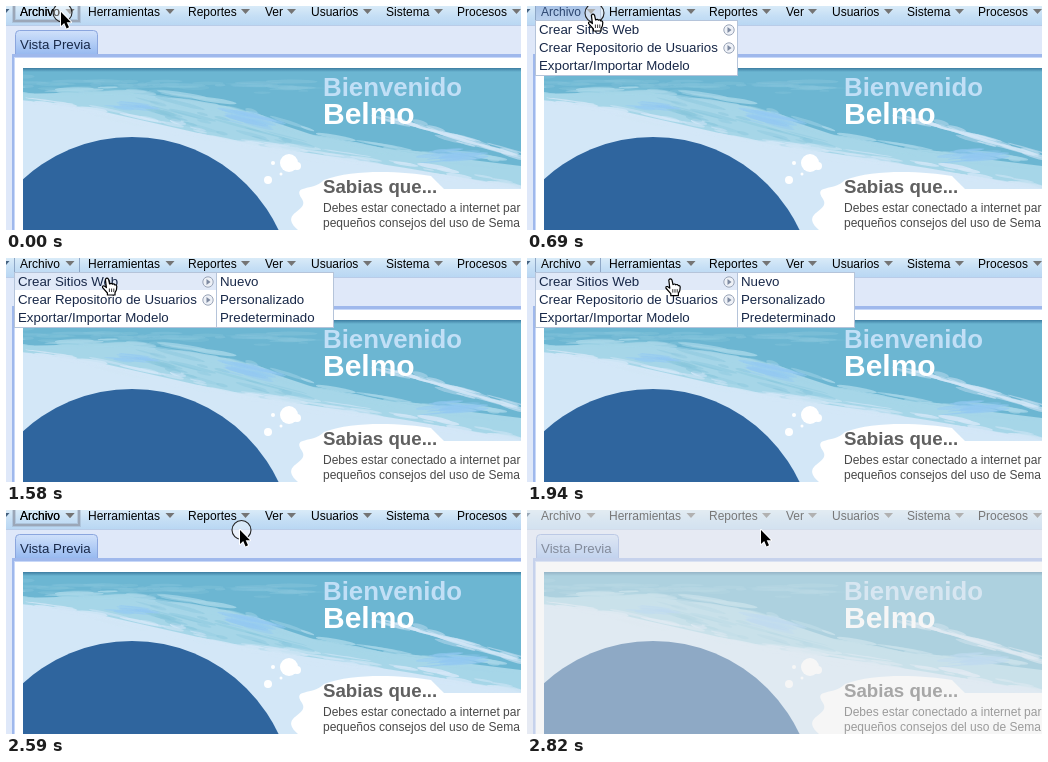
Animation of 515x224 px, one loop 2940 ms. Source, as an HTML page with a canvas:

```html
<!DOCTYPE html>
<html lang="es">
<head>
<meta charset="utf-8">
<title>Crear sitio</title>
<style>
html, body { margin: 0; width: 100%; height: 100%; overflow: hidden; background: #dfe8f9; }
canvas { display: block; width: 515px; height: 224px; }
</style>
</head>
<body>
<canvas id="stage" width="515" height="224"></canvas>
<script>
const W = 515, H = 224, LOOP = 2940;
const ctx = document.getElementById('stage').getContext('2d');
const FONT = '"Liberation Sans", Arial, sans-serif';
const BAR = [['Archivo', 14, 64], ['Herramientas', 82, 164], ['Reportes', 182, 239.5], ['Ver', 259, 285.5],
  ['Usuarios', 305, 361.5], ['Sistema', 380, 432.5], ['Procesos', 451, 510.5]];
const MENU = ['Crear Sitios Web', 'Crear Repositorio de Usuarios', 'Exportar/Importar Modelo'];
const SUBMENU = ['Nuevo', 'Personalizado', 'Predeterminado'];
const INK = '#182848', BORDER = '#8ba6de';

function text(c, str, x, y, size, color, weight = 'normal') {
  c.font = `${weight} ${size}px ${FONT}`;
  c.fillStyle = color;
  c.fillText(str, x, y);
}

function rect(c, x, y, w, h, color) {
  c.fillStyle = color;
  c.fillRect(x, y, w, h);
}

function frame(c, x, y, w, h, color) {
  c.strokeStyle = color;
  c.lineWidth = 1;
  c.strokeRect(x + .5, y + .5, w - 1, h - 1);
}

function disc(c, x, y, r, color) {
  c.fillStyle = color;
  c.beginPath();
  c.arc(x, y, r, 0, Math.PI * 2);
  c.fill();
}

function shade(c, y0, y1, ...colors) {
  const g = c.createLinearGradient(0, y0, 0, y1);
  colors.forEach((col, i) => g.addColorStop(i / (colors.length - 1), col));
  return g;
}

function triangle(c, x, y, color) {
  c.fillStyle = color;
  c.beginPath();
  c.moveTo(x - 4.5, y);
  c.lineTo(x + 4.5, y);
  c.lineTo(x, y + 5);
  c.fill();
}

let seed = 11;
const rnd = () => (seed = (seed * 16807) % 2147483647) / 2147483647;

// Dry-brush streaks scattered along a sloped band
function brush(c, n, x0, y0, x1, y1, spread, color, alpha) {
  c.fillStyle = color;
  for (let i = 0; i < n; i++) {
    const k = rnd(), x = x0 + (x1 - x0) * k;
    const y = y0 + (y1 - y0) * k + (rnd() + rnd() - 1) * spread;
    c.globalAlpha = alpha * (.5 + .5 * rnd());
    c.beginPath();
    c.ellipse(x, y, 5 + rnd() * 22, .6 + rnd() * 1.8, Math.atan2(y1 - y0, x1 - x0), 0, 7);
    c.fill();
  }
  c.globalAlpha = 1;
}

// Colour everything below a line of points and fray its edge
function wash(c, color, points) {
  c.beginPath();
  c.moveTo(0, H);
  points.forEach(([x, y]) => c.lineTo(x, y));
  c.lineTo(W, H);
  c.fillStyle = color;
  c.fill();
  points.slice(1).forEach(([x, y], i) => {
    const [px, py] = points[i];
    brush(c, Math.ceil((x - px) / 7), px, py, x, y, 8, color, .9);
  });
}

function paintBanner(c) {
  c.save();
  c.beginPath();
  c.rect(17, 62, W - 17, H - 62);
  c.clip();
  rect(c, 17, 62, W - 17, H - 62, '#6cb6d2');
  brush(c, 45, 17, 78, 300, 80, 8, '#85c4db', .6);
  wash(c, '#a6d6e8', [[0, 88], [120, 86], [220, 100], [310, 130], [400, 146], [W, 160]]);
  wash(c, '#d3e7f7', [[0, 92], [90, 104], [170, 122], [240, 138], [310, 148], [400, 162], [W, 182]]);
  brush(c, 25, 130, 96, 300, 140, 12, '#85c4db', .5);
  brush(c, 30, 380, 112, 515, 150, 6, '#d3e7f7', .8);
  brush(c, 16, 225, 108, 258, 116, 8, '#93c9f2', .7);
  brush(c, 10, 115, 98, 142, 101, 5, '#93c9f2', .7);
  brush(c, 14, 430, 150, 462, 147, 8, '#93c9f2', .7);
  rect(c, 17, 62, W - 17, 4, shade(c, 62, 66, 'rgba(40,100,140,.7)', 'rgba(40,100,140,0)'));

  // White paint pool and splatter
  c.fillStyle = '#fff';
  c.beginPath();
  c.moveTo(292, H);
  c.bezierCurveTo(272, 206, 304, 206, 296, 193);
  c.bezierCurveTo(286, 178, 306, 186, 318, 174);
  c.bezierCurveTo(350, 162, 400, 166, 425, 170);
  c.lineTo(438, 183);
  c.lineTo(W, 183);
  c.lineTo(W, H);
  c.fill();
  disc(c, 283, 157, 9, '#fff');
  disc(c, 291, 160, 4, '#fff');
  disc(c, 267, 157, 2, '#fff');
  disc(c, 262, 174, 4, '#fff');
  disc(c, 275, 168, 1.5, '#fff');

  disc(c, 126, 293, 162, '#2f659e');
  text(c, 'Bienvenido', 317, 90, 25.8, '#c1dff6', 'bold');
  text(c, 'Belmo', 317, 118, 30, '#fff', 'bold');
  text(c, 'Sabias que...', 317, 187, 18.7, '#606060', 'bold');
  text(c, 'Debes estar conectado a internet para', 317, 206, 12, '#484848');
  text(c, 'pequeños consejos del uso de Sema', 317, 221, 12, '#484848');
  c.restore();
}

function paintPage(c) {
  rect(c, 0, 0, W, H, '#dfe8f9');
  rect(c, 0, 0, W, 19, shade(c, 0, 19, '#d9ebf8', '#c6dff5', '#b9d7f3'));
  rect(c, 0, 19, W, 1, '#b9cce8');
  triangle(c, -1, 3, '#44617f');
  BAR.forEach(([label, x, arrow]) => {
    text(c, label, x, 10, 12, '#000');
    triangle(c, arrow, 3, '#747474');
  });
  rect(c, 6, 48, W, H, '#9fb8ec');
  rect(c, 8, 51, W, H, '#c8d8f8');
  rect(c, 9, 52, W, H, '#fff');
  c.beginPath();
  c.roundRect(9.5, 24.5, 82, 26, [4, 4, 0, 0]);
  c.fillStyle = shade(c, 25, 50, '#cfe0fa', '#b1ccf5', '#93b6ef');
  c.fill();
  c.strokeStyle = BORDER;
  c.stroke();
  rect(c, 9, 48, 84, 3, '#9fb8ec');
  text(c, 'Vista Previa', 14, 43, 13.3, INK);
  paintBanner(c);
}

const page = document.createElement('canvas');
page.width = W;
page.height = H;
paintPage(page.getContext('2d'));

function barButton(hover) {
  if (hover) {
    rect(ctx, 8, 0, 65, 14, shade(ctx, 0, 14, '#a9c3e6', '#b9d0ee'));
  } else {
    ctx.strokeStyle = 'rgba(140,155,175,.35)';
    ctx.lineWidth = 4;
    ctx.strokeRect(8, -3, 65, 18);
    ctx.strokeStyle = '#9ba7b8';
    ctx.lineWidth = 2;
    ctx.strokeRect(8, -3, 65, 18);
  }
  text(ctx, 'Archivo', 14, 10, 12, hover ? '#2c4670' : '#000');
  triangle(ctx, 64, 3, '#747474');
}

function menu(items, x, w, active, nested) {
  rect(ctx, x, 14, w, 56, '#fff');
  if (active) rect(ctx, x + 1, 15, w - 2, 17, '#e0e9f8');
  frame(ctx, x, 14, w, 56, '#b5c4da');
  items.forEach((label, i) => {
    text(ctx, label, x + 4, 28 + i * 18, 13.3, INK);
    if (i >= nested) return;
    const y = 24 + i * 18;
    ctx.beginPath();
    ctx.arc(202, y, 5.2, 0, 7);
    ctx.fillStyle = '#eef1f7';
    ctx.fill();
    ctx.strokeStyle = '#9aa5b8';
    ctx.stroke();
    ctx.beginPath();
    ctx.moveTo(200.5, y - 3);
    ctx.lineTo(204.5, y);
    ctx.lineTo(200.5, y + 3);
    ctx.fillStyle = '#7d89a0';
    ctx.fill();
  });
}

const ARROW = new Path2D('M0 0V14L3.2 11L5.6 16.4L8 15.3L5.7 10.2H10Z');
const HAND = new Path2D('M-1.6 1.4Q0 -1 1.6 1.4L2.6 6Q4.4 4.6 5.4 6.2Q7.2 5.2 7.8 7Q9.6 6.4 9.8 8.6' +
  'L9.4 12L8 14.6V17H.4V15L-4.4 9.6Q-5 7.4 -2.6 8L-.6 9.6Z');

function cursor(x, y, hand) {
  ctx.save();
  ctx.translate(x, y);
  ctx.lineJoin = 'round';
  ctx.lineWidth = hand ? 1.2 : 2;
  ctx.strokeStyle = hand ? '#000' : '#fff';
  ctx.fillStyle = hand ? '#fff' : '#000';
  const shape = hand ? HAND : ARROW;
  if (hand) {
    ctx.fill(shape);
    ctx.stroke(shape);
    ctx.beginPath();
    for (const dx of [2.4, 4.6, 6.8]) {
      ctx.moveTo(dx, 10.5);
      ctx.lineTo(dx, 14);
    }
    ctx.lineWidth = .8;
    ctx.stroke();
  } else {
    ctx.stroke(shape);
    ctx.fill(shape);
  }
  ctx.restore();
}

function ring(x, y) {
  disc(ctx, x, y, 9.5, 'rgba(255,255,255,.4)');
  ctx.beginPath();
  ctx.arc(x, y, 9.5, 0, 7);
  ctx.strokeStyle = '#222';
  ctx.lineWidth = 1.1;
  ctx.stroke();
}

// start, end, steps, destination
const MOVES = [[220, 390, 4, 66, 8], [1050, 1220, 4, 101, 20], [1820, 2230, 8, 235, 22]];
// start, end, centre
const CLICKS = [[0, 40, 56.5, 6.5], [690, 750, 67.5, 7], [1520, 1580, 102, 20], [2590, 2640, 235.5, 20]];

function pointer(t) {
  if (t >= 2590) return [234, 20];
  let x = 55, y = 6;
  for (const [start, end, steps, tx, ty] of MOVES) {
    if (t < start) break;
    const gap = (end - start) / (steps - 1);
    const k = Math.min(steps, Math.floor((t - start) / gap + .001) + 1) / steps;
    const e = k * k * (3 - 2 * k);
    x += (tx - x) * e;
    y += (ty - y) * e;
  }
  return [x, y];
}

function draw(now) {
  const t = now % LOOP;
  const [x, y] = pointer(t);
  const hand = t >= 220 && t < 2590;
  const open = t >= 690 && t < 2590;
  ctx.drawImage(page, 0, 0);
  if (t < 220 || (t >= 2590 && t < 2820)) barButton(false);
  else if (hand && y < 14) barButton(true);
  if (open) {
    rect(ctx, 8, 0, 1, 14, '#8ea7c6');
    rect(ctx, 73, 0, 1, 14, '#8ea7c6');
    menu(MENU, 8, 203, y >= 14, 2);
  }
  if (open && t >= 1520) menu(SUBMENU, 210, 118, x > 210, 0);
  if (t >= 2640) rect(ctx, 0, 0, W, H, 'rgba(238,238,238,.5)');
  for (const [from, to, cx, cy] of CLICKS) if (t >= from && t < to) ring(cx, cy);
  cursor(x, y, hand);
}

const t0 = performance.now();
function tick() {
  draw(performance.now() - t0);
  requestAnimationFrame(tick);
}
tick();
</script>
</body>
</html>
```
